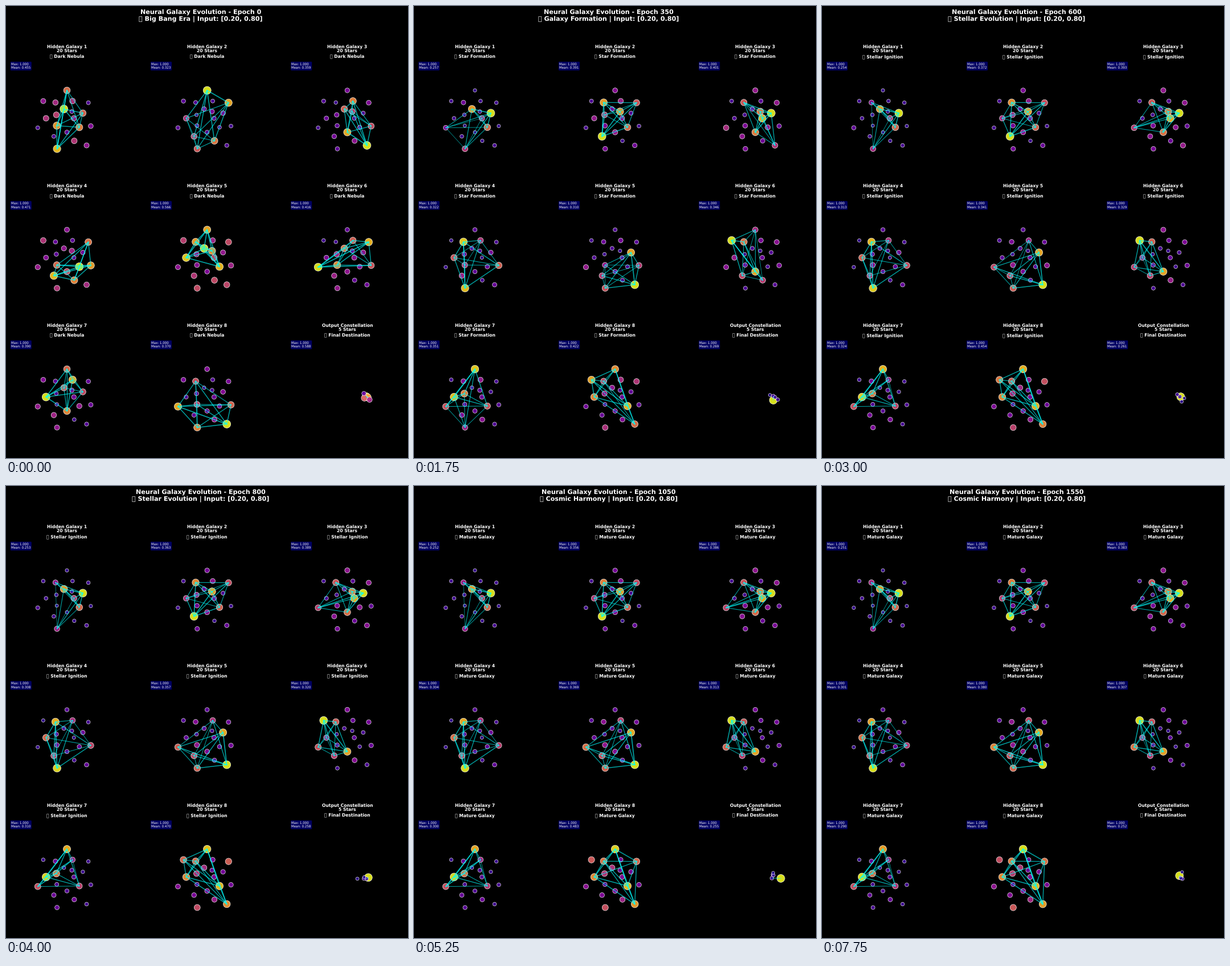
A matplotlib script that plays this animation: 706 by 793 pixels, repeating every 8 s.

```python
from itertools import combinations

import numpy as np
import matplotlib.pyplot as plt
from matplotlib.animation import FuncAnimation
from matplotlib.collections import LineCollection

plt.rcParams["font.family"] = "DejaVu Sans"
plt.rcParams["text.hinting"] = "none"

W, H, DPI = 706, 793, 50
HALF = 102               # half the side of a panel, in pixels
UNIT = HALF / 2.5        # pixels per data unit
FRAMES, INTERVAL, EPOCH_STEP = 32, 250, 50
FORMED, LAST = 150, 1550  # epochs at which the pattern has formed and settled
ICON = "\U0001f30c"

ERAS = [(100, "Big Bang Era", "Dark Nebula"),
        (500, "Galaxy Formation", "Star Formation"),
        (1000, "Stellar Evolution", "Stellar Ignition"),
        (10**6, "Cosmic Harmony", "Mature Galaxy")]

# Brightest stars of each galaxy, in rank order: at birth, formed, settled
LEADERS = [
    [(6, 14, 12, 18, 5, 1), (1, 6, 18, 14, 11, 0), (1, 6, 18, 0, 7, 14)],
    [(5, 2, 16, 14, 13, 10), (13, 7, 3, 18, 2, 9), (13, 3, 7, 18, 2, 10)],
    [(17, 15, 4, 6, 19, 3), (1, 0, 15, 3, 7, 17), (1, 0, 3, 15, 7, 11)],
    [(18, 13, 19, 16, 2, 12), (7, 14, 19, 12, 10, 4), (14, 7, 10, 13, 19, 4)],
    [(6, 10, 18, 5, 7, 3), (17, 1, 19, 14, 13, 12), (17, 1, 11, 14, 13, 4)],
    [(11, 2, 12, 6, 4, 19), (8, 15, 7, 16, 13, 5), (8, 15, 11, 7, 13, 10)],
    [(10, 4, 15, 5, 6, 1), (5, 10, 9, 18, 11, 14), (10, 5, 9, 11, 18, 4)],
    [(17, 11, 14, 19, 7, 12), (8, 18, 10, 5, 17, 4), (5, 18, 17, 10, 7, 2)],
]
# Mean activation of each panel at the same three moments
MEANS = [(.455, .260, .251), (.323, .416, .349), (.359, .411, .383),
         (.471, .334, .301), (.566, .269, .380), (.416, .369, .307),
         (.390, .387, .290), (.370, .380, .494), (.588, .279, .252)]


def galaxy_values(leaders, mean, noise):
    """Leaders fall off by rank; the others share what the mean leaves."""
    low = 1.4 * mean
    values = noise.copy()
    values[list(leaders)] = 0
    lead = low + (1 - low) * np.linspace(1, 0, len(leaders)) ** 1.5
    values *= (len(noise) * mean - lead.sum()) / values.sum()
    values[list(leaders)] = lead
    return values


def output_values(mean):
    return np.append(1, (5 * mean - 1) * np.array([.4, .3, .2, .1]))


def panel_keys(panel):
    if panel == 8:
        return [output_values(m) for m in MEANS[panel]]
    birth, grown = np.random.default_rng(panel).uniform(0.4, 1.6, (2, 20))
    return [galaxy_values(*key) for key in
            zip(LEADERS[panel], MEANS[panel], (birth, grown, grown))]


def ease(x):
    return (1 - np.exp(-3 * x)) / (1 - np.exp(-3))


def activations(panel, epoch):
    birth, formed, settled = KEYS[panel]
    if epoch < FORMED:
        return birth + (formed - birth) * ease(epoch / FORMED)
    return formed + (settled - formed) * ease((epoch - FORMED) / (LAST - FORMED))


def center(panel):
    return 107 + 246.2 * (panel % 3), 197 + 244.5 * (panel // 3)


def galaxy_points(panel):
    i = np.arange(20)
    angle = 2 * np.pi * i / 20
    r = UNIT * (0.3 + 0.4 * (i % 3) + 0.02 * i)
    cx, cy = center(panel)
    return np.column_stack([cx + r * np.cos(angle), cy - r * np.sin(angle)])


def output_points(epoch):
    """Five stars jitter around a core to the right of the panel centre."""
    cx, cy = center(8)
    jitter = np.random.default_rng(epoch).normal(0, 0.12 * UNIT, (5, 2))
    return jitter + (cx + 0.8 * UNIT, cy)


KEYS = [panel_keys(p) for p in range(9)]
GALAXIES = [galaxy_points(p) for p in range(8)]

fig = plt.figure(figsize=(W / DPI, H / DPI), dpi=DPI, facecolor="black")
ax = fig.add_axes([0, 0, 1, 1])
ax.set(xlim=(0, W), ylim=(H, 0))
ax.axis("off")

stars = ax.scatter([0], [0], s=1, c=["white"], edgecolors="white",
                   linewidths=1, alpha=0.9, zorder=1)
links = LineCollection([], colors="cyan", alpha=0.65, zorder=2,
                       capstyle="projecting")
ax.add_collection(links, autolim=False)

heading = ax.text(342, 5.4, "", color="white", fontsize=16, weight="bold",
                  ha="center", va="top")
titles, stats = [], []
for p in range(9):
    cx, cy = center(p)
    titles.append(ax.text(cx, cy - HALF - 4.2, "", color="white", fontsize=11,
                          weight="bold", ha="center", va="baseline", zorder=4))
    stats.append(ax.text(cx - 0.96 * HALF, cy - 0.96 * HALF, "", color="white",
                         fontsize=8, va="top", zorder=4,
                         bbox=dict(boxstyle="round", facecolor="darkblue",
                                   alpha=0.7)))


def constellation(points, values):
    """Link all pairs of the brightest 30 % of the stars."""
    top = np.argsort(-values)[:max(2, int(0.3 * len(values)))]
    for i, j in combinations(top, 2):
        yield (points[i], points[j]), 1.3 * (values[i] + values[j])


def update(frame):
    epoch = frame * EPOCH_STEP
    era, stage = next((e, s) for limit, e, s in ERAS if epoch < limit)
    heading.set_text(f"Neural Galaxy Evolution - Epoch {epoch}\n"
                     f"{ICON} {era} | Input: [0.20, 0.80]")
    all_points = GALAXIES + [output_points(epoch)]
    all_values = [activations(p, epoch) for p in range(9)]
    segments, widths = [], []
    for p, (points, values) in enumerate(zip(all_points, all_values)):
        for segment, width in constellation(points, values):
            segments.append(segment)
            widths.append(width)
        name, goal = ((f"Hidden Galaxy {p + 1}", stage) if p < 8 else
                      ("Output Constellation", "Final Destination"))
        titles[p].set_text(f"{name}\n{len(values)} Stars\n{ICON} {goal}")
        stats[p].set_text(f"Max: 1.000\nMean: {values.mean():.3f}")
    values = np.concatenate(all_values)
    stars.set_offsets(np.concatenate(all_points))
    stars.set_sizes(50 + 350 * values)
    stars.set_facecolor(plt.cm.plasma(values))
    links.set_segments(segments)
    links.set_linewidths(widths)
    return [stars, links, heading, *titles, *stats]


anim = FuncAnimation(fig, update, frames=FRAMES, interval=INTERVAL,
                     repeat=True, repeat_delay=0)
plt.show()
```
